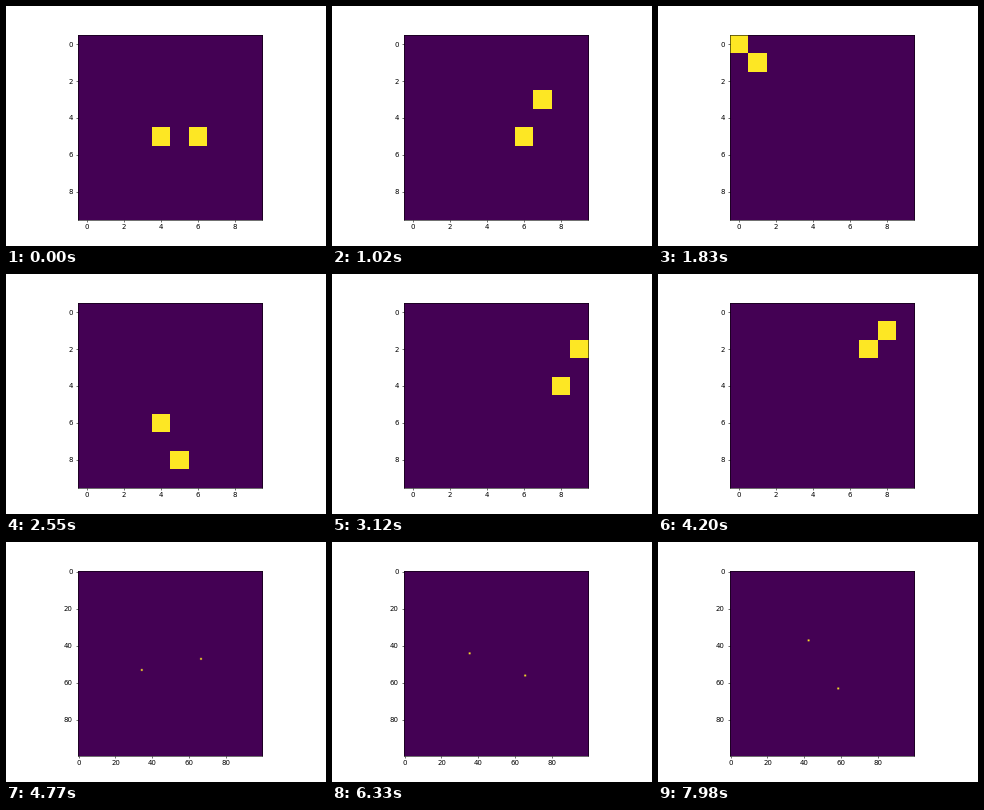
A matplotlib script that plays this animation: 320x240 px, repeating every 8000 ms.

```python
import math

import matplotlib.pyplot as plt
import numpy as np
from matplotlib.animation import FuncAnimation

FRAME_MS = 20
LOOP_MS = 8000
STEP_MS = 30            # time between simulation steps
SMALL_END = 4230        # the small grid is cleared here
LARGE_START = 4770      # the large grid appears here

# Drift of the close pair's centre on the wrapping grid, by step
DRIFT_STEP = [0, 18, 27, 34, 55, 61, 85, 104, 128, 141]
DRIFT_X = [0, 0.3, 0.75, 1.5, 4.5, 5.5, 9.4, 13.5, 25.5, 33.0]
DRIFT_Y = [0, -0.15, -0.45, -1.0, -3.9, -4.5, -8.2, -12.0, -25.5, -34.0]

# Kepler orbit of the wide pair, timed from its farthest point
AXIS_A, AXIS_B = 13.4538, 13.12
ECC = 0.245
MEAN_MOTION = 0.567     # rad per second
APO_TIME = 5.37         # seconds
TILT = 0.0088


def close_pair(step):
    """Centre and offset of the two bodies on the 10 x 10 grid."""
    cx = 5 + np.interp(step, DRIFT_STEP, DRIFT_X)
    cy = 5 + np.interp(step, DRIFT_STEP, DRIFT_Y)
    phase = math.radians(29.9 * step + 0.005 * step ** 2)
    return cx, cy, math.cos(phase), math.sin(phase)


def wide_pair(step):
    """Centre and offset of the two bodies on the 100 x 100 grid."""
    mean = MEAN_MOTION * (step * STEP_MS / 1000 - APO_TIME)
    ecc_anomaly = mean / (1 + ECC)
    for _ in range(6):
        error = ecc_anomaly + ECC * math.sin(ecc_anomaly) - mean
        ecc_anomaly -= error / (1 + ECC * math.cos(ecc_anomaly))
    dx = AXIS_A * (math.cos(ecc_anomaly) + ECC)
    dy = AXIS_B * math.sin(ecc_anomaly) + TILT * dx
    return 50, 50, dx, dy


def grid_with(size, cx, cy, dx, dy):
    grid = np.zeros((size, size))
    for sign in (1, -1):
        col = math.floor(cx + sign * dx + 0.5) % size
        row = math.floor(cy + sign * dy + 0.5) % size
        grid[row, col] = 1
    return grid


def add_grid(size):
    ax = fig.add_axes([0.125, 0.11, 0.775, 0.77])
    # Blend colours rather than values where cells are smoothed
    image = ax.imshow(np.zeros((size, size)), vmin=0, vmax=1,
                      interpolation_stage="rgba")
    return ax, image


fig = plt.figure(figsize=(6.4, 4.8), dpi=50)
small_ax, small_image = add_grid(10)
large_ax, large_image = add_grid(100)


def draw(frame):
    step = (frame * FRAME_MS + 10) // STEP_MS
    now = step * STEP_MS
    small_ax.set_visible(now < SMALL_END)
    large_ax.set_visible(now >= LARGE_START)
    if now < SMALL_END:
        small_image.set_data(grid_with(10, *close_pair(step)))
    elif now >= LARGE_START:
        large_image.set_data(grid_with(100, *wide_pair(step)))
    return small_image, large_image


anim = FuncAnimation(fig, draw, frames=LOOP_MS // FRAME_MS, interval=FRAME_MS,
                     init_func=lambda: draw(0), repeat=True, repeat_delay=0)
plt.show()
```
